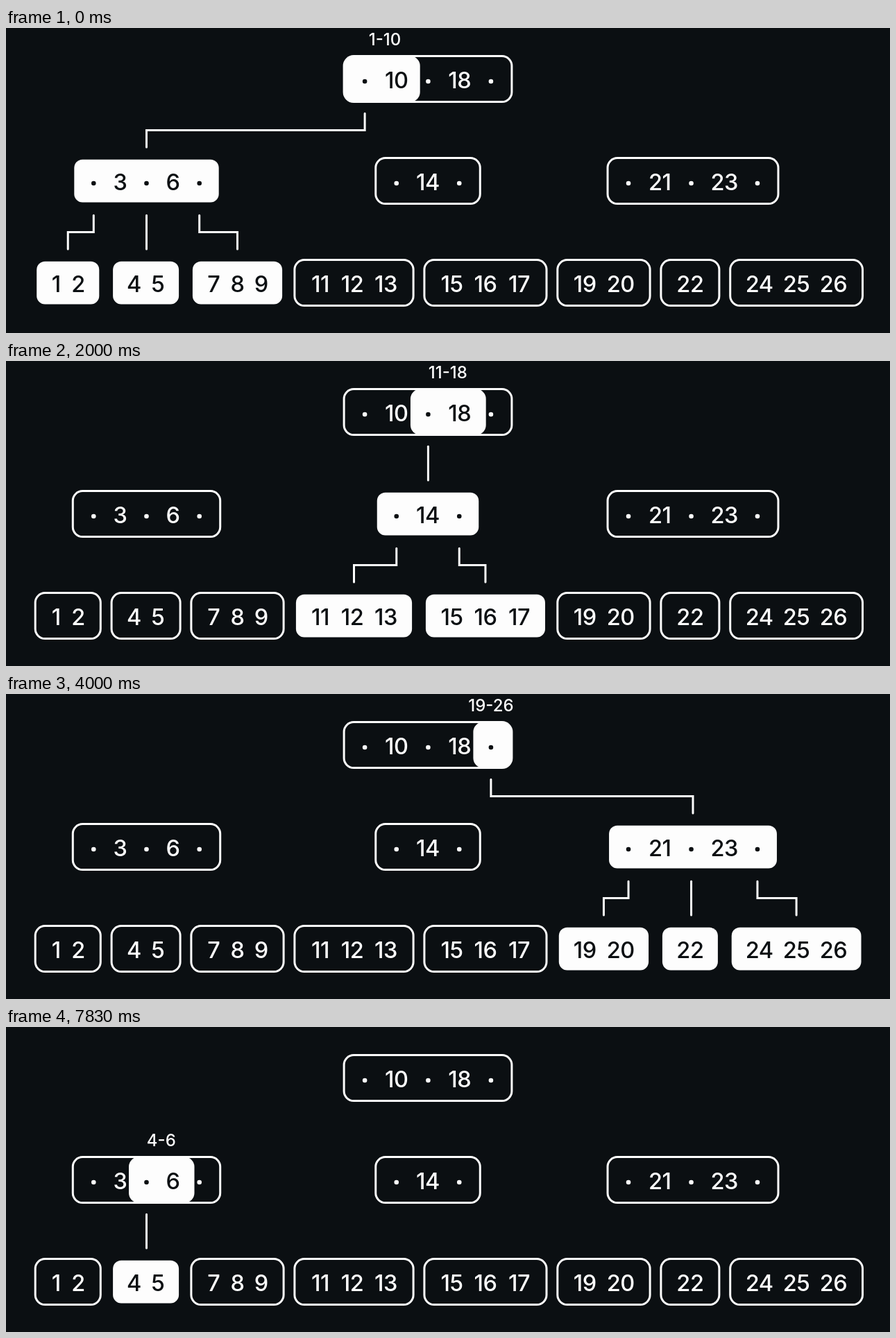
Animation, 1274 px wide and 440 px high, one loop 8 s. Source, as an HTML page:

```html
<!DOCTYPE html>
<html lang="en">
<head>
<meta charset="utf-8">
<title>B-tree ranges</title>
<style>
  html, body { margin: 0; width: 100%; height: 100%; overflow: hidden; background: #0b0f12; }
  #stage { position: relative; width: 1274px; height: 440px; overflow: hidden; }
  #strip { position: absolute; left: 0; top: 0; animation: scenes 8s step-end infinite; }
  #strip svg { display: block; }
  @keyframes scenes {
    0% { transform: translateY(0); }
    17.75% { transform: translateY(-440px); }
    42.75% { transform: translateY(-880px); }
    65.625% { transform: translateY(-1320px); }
    91.625%, 100% { transform: translateY(-1760px); }
  }
  text { font: 500 32.5px Inter, "Liberation Sans", sans-serif; letter-spacing: -.5px; text-anchor: middle; }
  text.label { font-size: 24px; letter-spacing: 0; }
  .light, .solid { fill: #fdfdfd; }
  .dark { fill: #0b0f12; }
  .box, .link { fill: none; stroke: #fdfdfd; stroke-width: 3; }
  .link { stroke-linecap: round; }
</style>
</head>
<body>
<div id="stage"><div id="strip"></div></div>
<script>
const rowY = row => 73.6 + 147 * row;
const PAD = 22.8, SPACE = 15, GAP = 15.8;   // leaves
const EDGE = 30, SLOT = 57;                 // branches: box edge to dot, dot to dot without the key

const digitWidth = d => d === '1' ? 14.3 : d === '0' ? 20 : 19.2;
const keyWidth = key => [...String(key)].reduce((sum, d) => sum + digitWidth(d), 0);

let nextLeft = 42.2;

function leaf(first, last) {
  const left = nextLeft, keys = [];
  let x = left + PAD;
  for (let key = first; key <= last; key++) {
    const w = keyWidth(key);
    keys.push({ key, w, x: x + w / 2 });
    x += w + SPACE;
  }
  const right = x - SPACE + PAD;
  nextLeft = right + GAP;
  return { row: 2, left, right, x: (left + right) / 2, keys, dots: [], kids: [], min: first, max: last };
}

function branch(row, x, values, kids) {
  const width = values.reduce((sum, v) => sum + keyWidth(v) + SLOT, 2 * EDGE);
  const left = x - width / 2;
  const dots = [left + EDGE];
  const keys = values.map((key, i) => {
    const w = keyWidth(key), mid = dots[i] + (w + SLOT) / 2;
    dots.push(dots[i] + w + SLOT);
    return { key, w, x: mid };
  });
  return { row, left, right: left + width, x, keys, dots, kids, min: kids[0].min, max: kids.at(-1).max };
}

const low = branch(1, 202.5, [3, 6], [leaf(1, 2), leaf(4, 5), leaf(7, 9)]);
const mid = branch(1, 608, [14], [leaf(11, 13), leaf(15, 17)]);
const high = branch(1, 990, [21, 23], [leaf(19, 20), leaf(22, 22), leaf(24, 26)]);
const root = branch(0, 608, [10, 18], [low, mid, high]);

const subtree = n => [n, ...n.kids.flatMap(subtree)];

const rect = (cls, x1, x2, cy, half, r) =>
  `<rect class="${cls}" x="${x1}" y="${cy - half}" width="${x2 - x1}" height="${half * 2}" rx="${r}"/>`;

// the part of a branch that covers one dot and the key after it
function slotSpan(n, i) {
  const start = i ? n.dots[i] - 25.5 : n.left;
  return [start, n.keys[i] ? start + n.keys[i].w + 75.3 : n.right];
}

function drawNode(n, full, span) {
  const cy = rowY(n.row);
  const tone = x => full || (span && x > span[0] && x < span[1]) ? 'dark' : 'light';
  return (full ? rect('solid', n.left + 2, n.right - 2, cy, 30.8, 12) : rect('box', n.left, n.right, cy, 33, 14)) +
    (span ? rect('solid', ...span, cy, 33, 14) : '') +
    n.dots.map(x => `<circle class="${tone(x)}" cx="${x}" cy="${cy + 3.4}" r="3.3"/>`).join('') +
    n.keys.map(k => `<text class="${tone(k.x)}" x="${k.x}" y="${cy + 13.6}">${k.key}</text>`).join('');
}

function drawLink(n, i) {
  const from = n.dots[i], to = n.kids[i].x, y = rowY(n.row) + 49.7;
  const bend = Math.abs(from - to) < 4 ? '' : `V${y + 24.2}H${to}`;
  return `<path class="link" d="M${from} ${y}${bend}V${y + 48.8}"/>`;
}

function drawLabel(n, i) {
  const key = n.keys[i], kid = n.kids[i];
  const x = key ? (n.dots[i] - 5 + key.x + key.w / 2) / 2 : n.dots[i];
  return `<text class="label light" x="${x}" y="${rowY(n.row) - 48.6}">${kid.min}-${key ? key.key : kid.max}</text>`;
}

function scene([n, i]) {
  const kid = n.kids[i], lit = subtree(kid);
  return '<svg width="1274" height="440">' +
    subtree(root).map(m => drawNode(m, lit.includes(m), m === n && slotSpan(n, i))).join('') +
    drawLink(n, i) + kid.kids.map((_, j) => drawLink(kid, j)).join('') +
    drawLabel(n, i) + '</svg>';
}

const scenes = [[root, 0], [root, 1], [root, 2], [low, 0], [low, 1]];
document.getElementById('strip').innerHTML = scenes.map(scene).join('');
</script>
</body>
</html>
```
